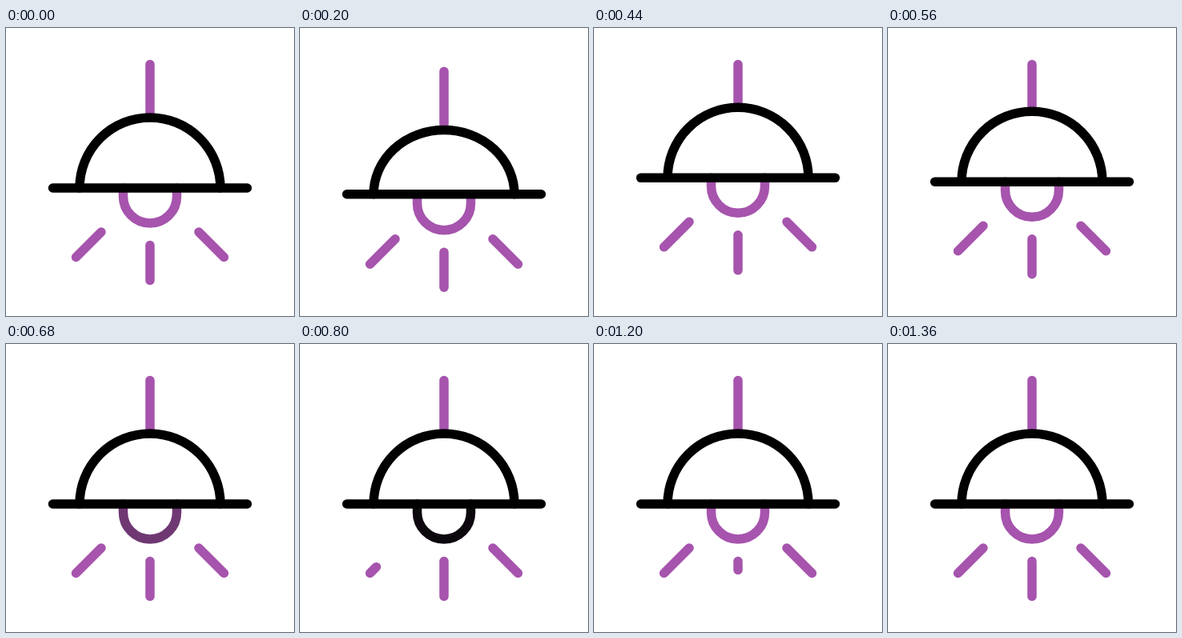
These frames come from a looping animation (360x360 px, 1.48 s). An HTML page:

```html
<!DOCTYPE html>
<html lang="en">
<head>
<meta charset="utf-8">
<title>Hanging lamp</title>
<style>
  html, body { margin: 0; width: 100%; height: 100%; overflow: hidden; background: #fff; }
  svg { display: block; width: 100vw; height: 100vh; }
</style>
</head>
<body>
<svg viewBox="0 0 360 360" fill="none" stroke-width="11.5" stroke-linecap="round">
  <g stroke="#a654ad">
    <path id="cord"/>
    <path id="left"/>
    <path id="right"/>
    <path id="down"/>
  </g>
  <path id="bulb"/>
  <g stroke="#000">
    <path id="dome"/>
    <path id="bar"/>
  </g>
</svg>
<script>
const LOOP = 1480, STEP = 40;
const PURPLE = [166, 84, 173];
const el = id => document.getElementById(id);
const draw = (id, d) => el(id).setAttribute('d', d);
const ramp = (t, a, b) => Math.min(1, Math.max(0, (t - a) / (b - a)));
const ease = p => (1 - Math.cos(Math.PI * p)) / 2;

// Each ray wipes outward, stays away briefly, then grows from its inner end.
const rays = [
  { id: 'left', from: [119, 255], to: [87.5, 286.5], start: 680 },
  { id: 'right', from: [241, 255], to: [272.5, 286.5], start: 800 },
  { id: 'down', from: [180, 271.5], to: [180, 315.5], start: 920 }
];

// Pulled down, springs up, settles.
function shift(t) {
  if (t < 280) return 14 * ease(ramp(t, 90, 280));
  if (t < 460) return 14 - 27.5 * ease(ramp(t, 280, 460));
  return -13.5 * (1 - ease(ramp(t, 460, 680)));
}

function drawRay({ id, from, to, start }, t, y) {
  const grow = ramp(t, start + 240, start + 400);
  const a = grow > 0 ? 0 : ramp(t, start, start + 160);
  const b = grow > 0 ? grow : 1;
  const at = p => `${from[0] + (to[0] - from[0]) * p} ${from[1] + (to[1] - from[1]) * p + y}`;
  draw(id, a < b ? `M${at(a)}L${at(b)}` : '');
}

function render(ms) {
  const now = ms % LOOP;
  const t = now < 120 ? 0 : Math.min(1360, Math.floor(now / STEP) * STEP);
  const y = shift(t);
  const pull = Math.max(0, y);
  const base = 200 + y - pull * 0.11;
  const ry = 88 - pull * 0.88;
  const glow = t < 770 ? 1 - ramp(t, 640, 760) : ramp(t, 775, 1087);

  draw('cord', `M180 ${45.5 + pull}V${base - ry - 2}`);
  draw('dome', `M92 ${base}A88 ${ry} 0 0 1 268 ${base}`);
  draw('bar', `M58.5 ${base}H301.5`);
  draw('bulb', `M146.5 ${base}V${210.5 + y}A33.5 33.5 0 0 0 213.5 ${210.5 + y}V${base}`);
  el('bulb').setAttribute('stroke', `rgb(${PURPLE.map(c => Math.round(c * glow))})`);
  rays.forEach(r => drawRay(r, t, y));
}

const began = performance.now();
function tick() {
  render(performance.now() - began);
  requestAnimationFrame(tick);
}
tick();
</script>
</body>
</html>
```
